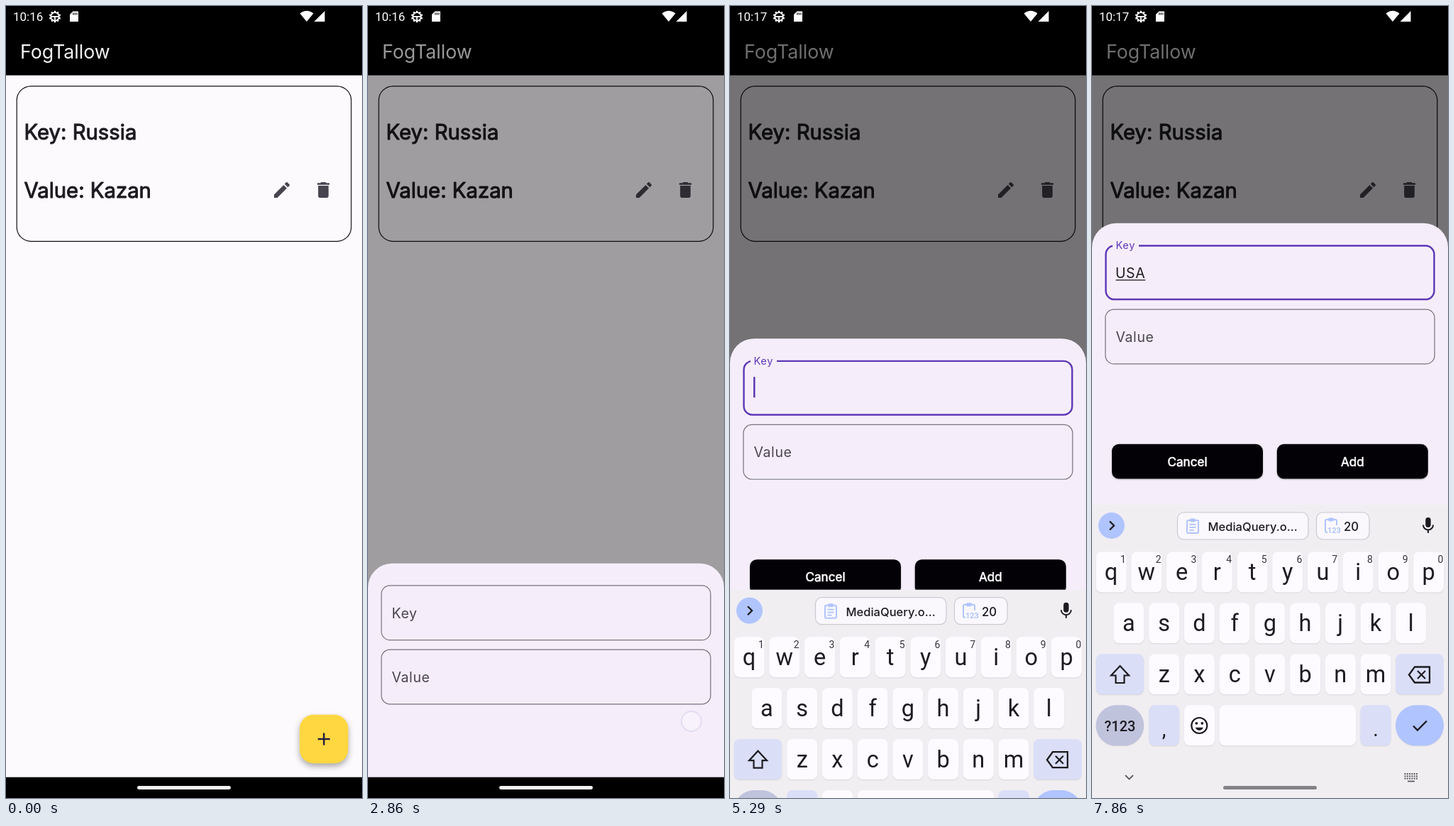
An HTML page with a canvas that plays this animation: 502 by 1115 pixels, repeating every 8 s.

```html
<!DOCTYPE html>
<html lang="en">
<head>
<meta charset="utf-8">
<title>Key and value list</title>
<style>
html, body { margin: 0; width: 100%; height: 100%; overflow: hidden; background: #000; }
canvas { display: block; width: 502px; height: 1115px; }
</style>
</head>
<body>
<canvas id="stage" width="502" height="1115"></canvas>
<script>
const g = document.getElementById('stage').getContext('2d');
const W = 502, H = 1115, LOOP = 8000, FPS = 7;
const BAR = 97.6, NAV = 1085.7;
const APP = 'Inter, sans-serif', SYS = 'Roboto, sans-serif';
const INK = '#1d1b20', GREY = '#49454f', PURPLE = '#5f38b6', BLUE = '#b0c4ff';
const PENCIL = new Path2D('M3 17.25V21h3.75L17.81 9.94l-3.75-3.75L3 17.25zM20.71 7.04a1 1 0 0 0 0-1.41l-2.34-2.34a1 1 0 0 0-1.41 0l-1.83 1.83 3.75 3.75 1.83-1.83z');
const TRASH = new Path2D('M6 19c0 1.1.9 2 2 2h8c1.1 0 2-.9 2-2V7H6v12zM19 4h-3.5l-1-1h-5l-1 1H5v2h14V4z');

const clamp = v => Math.max(0, Math.min(1, v));
const span = (t, start, length) => clamp((t - start) / length);
const mix = (a, b, p) => a + (b - a) * p;
const easeOut = p => 1 - (1 - p) ** 2;
const easeInOut = p => p < .5 ? 4 * p ** 3 : 1 - 4 * (1 - p) ** 3;

// "thick" emboldens the regular weight without widening the letters.
function text(s, x, y, size, color, { weight = 400, family = APP, align = 'left', gap = 0, thick = false } = {}) {
  g.font = `${weight} ${size}px ${family}`;
  g.textAlign = align;
  g.letterSpacing = gap + 'px';
  g.fillStyle = color;
  g.fillText(s, x, y);
  if (thick) {
    g.strokeStyle = color;
    g.lineWidth = size / 30;
    g.lineJoin = 'round';
    g.strokeText(s, x, y);
    g.lineJoin = 'miter';
  }
}

function rect(x, y, w, h, color) {
  g.fillStyle = color;
  g.fillRect(x, y, w, h);
}

function box(x, y, w, h, r, fill, stroke, width = 1.2) {
  g.beginPath();
  g.roundRect(x, y, w, h, r);
  if (fill) { g.fillStyle = fill; g.fill(); }
  if (stroke) { g.strokeStyle = stroke; g.lineWidth = width; g.stroke(); }
}

function disc(x, y, r, color) {
  g.beginPath();
  g.arc(x, y, r, 0, 7);
  g.fillStyle = color;
  g.fill();
}

function line(points, color, width, close) {
  g.beginPath();
  points.forEach(([x, y]) => g.lineTo(x, y));
  if (close) g.closePath();
  g.strokeStyle = color;
  g.lineWidth = width;
  g.stroke();
}

function shape(points, color) {
  g.beginPath();
  points.forEach(([x, y]) => g.lineTo(x, y));
  g.fillStyle = color;
  g.fill();
}

function shadow(color, blur, dy) {
  g.shadowColor = color;
  g.shadowBlur = blur;
  g.shadowOffsetY = dy;
}

function at(x, y, draw, scale = 1) {
  g.save();
  g.translate(x, y);
  g.scale(scale, scale);
  draw();
  g.restore();
}

function icon(path, x, y) {
  at(x, y, () => {
    g.translate(-12, -12);
    g.fillStyle = GREY;
    g.fill(path);
  }, 1.22);
}

function touch(x, y, alpha) {
  if (alpha <= 0) return;
  g.save();
  g.globalAlpha = alpha;
  disc(x, y, 14, 'rgba(255,255,255,.72)');
  g.strokeStyle = 'rgba(170,165,225,.75)';
  g.lineWidth = 2;
  g.stroke();
  g.restore();
}

function gear() {
  for (let i = 0; i < 10; i++) {
    g.save();
    g.rotate(i * Math.PI / 5);
    rect(-1.2, -8.2, 2.4, 3, '#fff');
    g.restore();
  }
  g.beginPath();
  g.arc(0, 0, 5.8, 0, 7);
  g.strokeStyle = '#fff';
  g.lineWidth = 1.8;
  g.stroke();
  rect(-5, -1, 10, 1.8, '#fff');
  rect(-.9, 0, 1.8, 5.5, '#fff');
}

function statusBar(clock) {
  rect(0, 0, W, 30, '#000');
  text(clock, 10, 21, 17, '#fff', { family: SYS });
  at(69, 15, gear);
  shape([[94.5, 7.5], [102, 7.5], [102, 22], [90, 22], [90, 12]], '#fff');
  for (let i = 0; i < 3; i++) rect(94.3 + i * 2.5, 9.5, 1.2, 3, '#000');
  g.beginPath();
  g.moveTo(424, 22);
  g.lineTo(414.5, 10.5);
  g.quadraticCurveTo(424, 3, 433.5, 10.5);
  g.closePath();
  g.fillStyle = '#fff';
  g.fill();
  shape([[449.5, 7], [449.5, 22], [434.5, 22]], '#fff');
}

function fab(t) {
  const x = 414.1, y = 997.8, size = 68.4, r = 19.5;
  g.save();
  shadow('rgba(0,0,0,.34)', 8, 4);
  box(x, y, size, size, r, '#ffd740');
  g.restore();
  const p = span(t, 2480, 230);
  if (p > 0) {
    const glow = g.createRadialGradient(450, 1018, 0, 450, 1018, mix(22, 62, p));
    glow.addColorStop(0, `rgba(90,80,150,${.27 * p})`);
    glow.addColorStop(.55, `rgba(90,80,150,${.22 * p})`);
    glow.addColorStop(1, `rgba(90,80,150,${.1 * p})`);
    box(x, y, size, size, r, glow);
  }
  rect(439.7, 1030.8, 17.1, 2.4, '#211d40');
  rect(447.1, 1023.5, 2.4, 17.1, '#211d40');
}

function page(t) {
  rect(0, 0, W, H, '#fdfafe');
  rect(0, 0, W, BAR, '#000');
  text('FogTallow', 20, 73.5, 26.8, '#f4f2f5');
  box(15.2, 112.8, 471.6, 218.5, 20, null, '#111', 1.2);
  text('Key: Russia', 25.5, 187.8, 29.3, INK, { thick: true });
  text('Value: Kazan', 25.5, 270.3, 29.3, INK, { thick: true });
  icon(PENCIL, 389, 259);
  icon(TRASH, 447.5, 259);
  fab(t);
}

function button(label, x, y) {
  g.save();
  shadow('rgba(0,0,0,.3)', 2, 1);
  box(x, y, 213, 48.8, 9.8, '#030006');
  g.restore();
  text(label, x + 106.5, y + 31, 17.1, '#fff', { align: 'center', thick: true });
}

function field(width, color) {
  const inset = 18.3 + width / 2;
  box(inset, 12.2 + inset, W - 2 * inset, 78 - width, 12, null, color, width);
}

function keyField(t) {
  const p = span(t, 4940, 167), focused = p > 0;
  field(focused ? 2.44 : 1.22, focused ? PURPLE : '#77737d');
  if (p > .5) rect(29, 28, 37, 6, '#f5eefa');
  text('Key', 33.5, mix(76.8, 36.5, p), mix(19.5, 14.6, p), focused ? PURPLE : GREY, { gap: .6 });
  if (!focused) return;

  const strokes = [6280, 6700, 7130];
  const count = strokes.filter(s => t >= s).length;
  const word = 'USA'.slice(0, count);
  let end = 33;
  if (count) {
    text(word, 33, 77, 19.5, INK, { gap: .6 });
    end += g.measureText(word).width;
    rect(33.5, 79.4, end - 33.5, 1.3, INK);
  }
  const since = t - (count ? strokes[count - 1] : 4990);
  if (since % 1000 < 500) rect(end, 54, 2.5, 29, PURPLE);
}

function sheet(t, y) {
  at(0, y, () => {
    box(0, 0, W, H, 34, '#f5eefa');
    keyField(t);
    at(0, 90.2, () => field(1.22, '#77737d'));
    text('Value', 33.5, 167, 19.5, GREY, { gap: .6 });
    button('Cancel', 28, 311);
    button('Add', 260.8, 311);
  });
}

function clipboard(x, y, digits) {
  box(x - 8, y - 8, 16, 18, 2, null, BLUE, 2);
  box(x - 4, y - 10.5, 8, 5, 2, BLUE);
  if (digits) {
    rect(x - 5, y, 18, 12, '#faf8fc');
    text('123', x - 5, y + 11, 11, BLUE, { weight: 700, family: SYS });
  } else {
    for (let i = 0; i < 3; i++) rect(x - 4.5, y - 3 + i * 4, i < 2 ? 9 : 6, 1.8, BLUE);
  }
}

function toolbar() {
  disc(27.5, 29.5, 18.5, BLUE);
  line([[25, 23.5], [31, 29.5], [25, 35.5]], INK, 2.3);
  box(120.5, 11, 184.5, 38, 9, '#faf8fc', '#cbc8d1');
  box(316.5, 11, 74.5, 38, 9, '#faf8fc', '#cbc8d1');
  clipboard(142, 30, false);
  clipboard(337, 29, true);
  text('MediaQuery.o...', 163.5, 37, 16.5, INK, { weight: 500 });
  text('20', 355, 37, 16.8, INK, { weight: 500 });
  box(470.3, 18, 7.4, 14, 3.7, INK);
  g.beginPath();
  g.arc(474, 28.5, 7, 0, Math.PI);
  g.strokeStyle = INK;
  g.lineWidth = 2;
  g.stroke();
  rect(473, 35, 2, 5, INK);
}

function key(x, y, w, color = '#fdfbff', r = 8) {
  g.save();
  shadow('rgba(0,0,0,.1)', 1, 1);
  box(x, y, w, 57, r, color);
  g.restore();
}

function letters(row, x, y, numbered) {
  [...row].forEach((c, i) => {
    const left = x + i * 49.72;
    key(left, y, 43);
    text(c, left + 21.5, y + 39.5, 32.5, INK, { family: SYS, align: 'center' });
    if (numbered) text((i + 1) % 10, left + 38.3, y + 15.5, 14, '#36343b', { family: SYS, align: 'center' });
  });
}

function face(x, y) {
  g.strokeStyle = INK;
  g.lineWidth = 2.2;
  g.beginPath();
  g.arc(x, y, 11, 0, 7);
  g.stroke();
  disc(x - 4, y - 3.2, 1.9, INK);
  disc(x + 4, y - 3.2, 1.9, INK);
  g.beginPath();
  g.arc(x, y + .8, 6, .35, Math.PI - .35);
  g.closePath();
  g.fillStyle = INK;
  g.fill();
}

function keyboard(y, handle) {
  at(0, y, () => {
    const soft = '#dadff7';
    rect(0, 0, W, H, '#f1eef2');
    toolbar();
    letters('qwertyuiop', 5.6, 66.5, true);
    letters('asdfghjkl', 30.4, 138.3);
    letters('zxcvbnm', 80.2, 210.3);

    key(5.6, 210.3, 67.6, soft);
    line([[39.5, 227], [52, 240.5], [45.5, 240.5], [45.5, 251], [33.5, 251], [33.5, 240.5], [27, 240.5]], INK, 2.2, true);
    key(428, 210.3, 68, soft);
    line([[447, 239.5], [455, 228.5], [476, 228.5], [476, 250.5], [455, 250.5]], INK, 2.3, true);
    line([[459, 234], [470, 245]], INK, 2.2);
    line([[470, 234], [459, 245]], INK, 2.2);

    key(5.6, 282.3, 67.6, '#bfc3dc', 28.5);
    text('?123', 39.5, 319, 20, INK, { family: SYS, align: 'center', weight: 500 });
    key(80.2, 282.3, 43, soft);
    text(',', 101.7, 326, 29, INK, { family: SYS, align: 'center' });
    key(130, 282.3, 43);
    face(151.3, 311);
    key(179.6, 282.3, 192.4);
    key(378.5, 282.3, 43, soft);
    text('.', 400, 326, 29, INK, { family: SYS, align: 'center' });
    key(428, 282.3, 68, BLUE, 28.5);
    line([[453, 311.5], [459, 317.5], [472, 304.5]], INK, 2.3);

    line([[47, 381], [52.5, 386.5], [58, 381]], '#5f5d63', 1.8);
    for (let r = 0; r < 3; r++)
      for (let c = 0; c < 6; c++) rect(440.5 + c * 3.3, 378 + r * 3.3, 2, 2, '#5f5d63');
    rect(445, 388.6, 10, 1.8, '#5f5d63');
  });
  if (handle) box(185, 1098, 132, 5, 2.5, '#858287');
}

function draw(t) {
  page(t);
  const open = easeOut(span(t, 2731, 250));
  if (open > 0) {
    rect(0, 0, W, H, `rgba(0,0,0,${.54 * open ** 1.3})`);
    const lift = easeInOut(span(t, 5028, 490));
    sheet(t, mix(NAV, 686.8, open) - 381 * lift);
  }
  statusBar(t < 4700 ? '10:16' : '10:17');
  rect(0, NAV, W, H - NAV, '#000');
  box(185, 1098, 132, 4.9, 2.4, '#f4f2f4');
  const rise = easeInOut(span(t, 5000, 490));
  if (rise > 0) keyboard(mix(H, 702, rise), t > 5850);

  if (t > 2560) touch(456, 1007, 1 - .65 * span(t, 2710, 145) - .35 * span(t, 2860, 120));
  if (t > 4700) touch(369.5, 739, 1 - span(t, 4850, 230));
}

function tick(now) {
  const t = now % LOOP;
  draw(Math.floor((t + 6) * FPS / 1000) * 1000 / FPS);
  requestAnimationFrame(tick);
}
requestAnimationFrame(tick);
</script>
</body>
</html>
```
